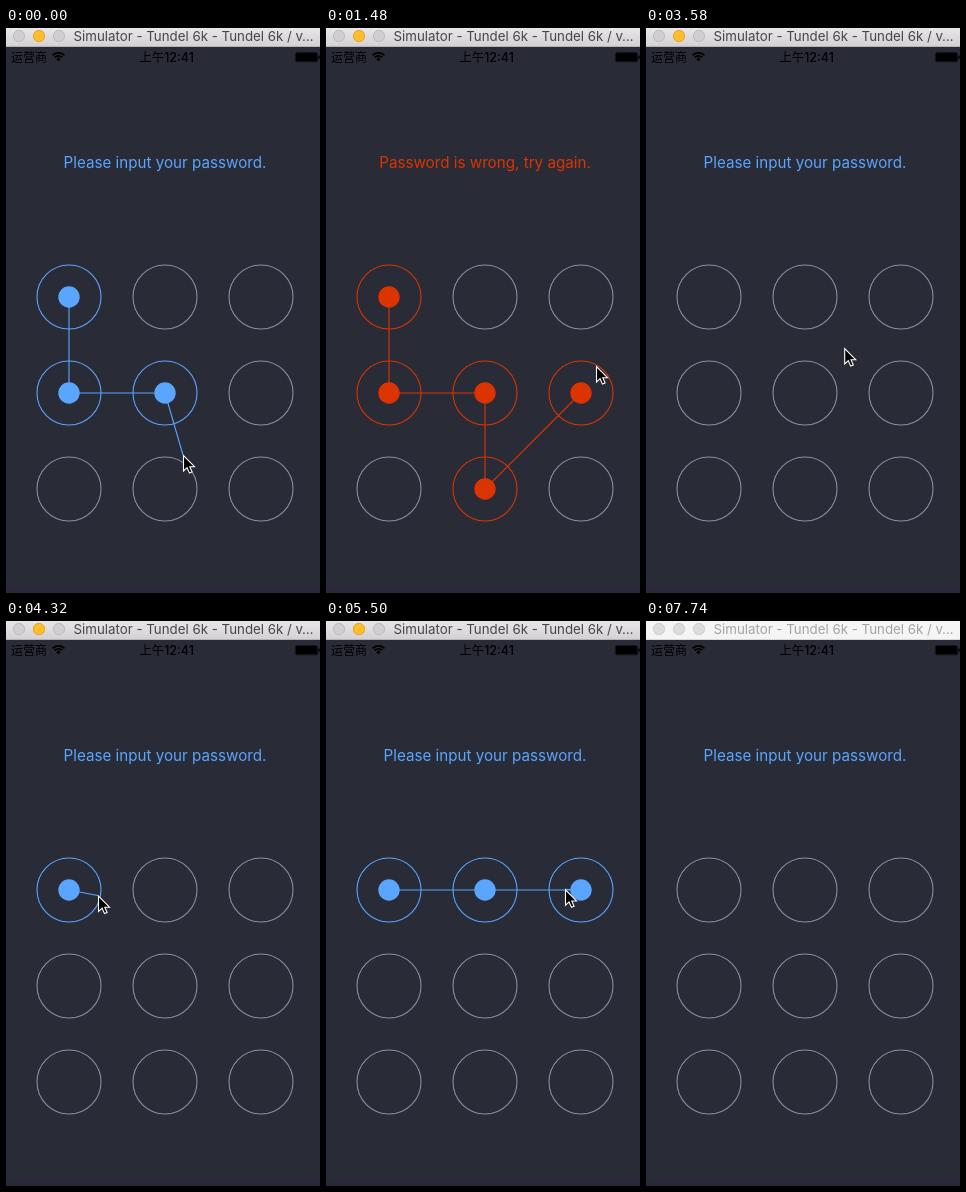
Write an HTML page with a canvas that moves like this. It is 314 px wide and 565 px high and loops after 7890 ms.

```html
<!DOCTYPE html>
<html lang="en">
<head>
<meta charset="utf-8">
<title>Pattern lock</title>
<style>
html, body { margin: 0; width: 100%; height: 100%; overflow: hidden; background: #292b37; }
canvas { display: block; }
</style>
</head>
<body>
<canvas id="stage" width="314" height="565"></canvas>
<script>
const ctx = document.getElementById('stage').getContext('2d');
const LOOP = 7890, STEP = 145, RADIUS = 32, THIN = 1.1;
const BLUE = '#5aa6ff', RED = '#dc3400', IDLE = '#8c8da8';
const SANS = 'Inter, "Open Sans", sans-serif';
const CJK = 'Inter, "Noto Sans CJK SC", "Noto Sans CJK", sans-serif';

// Each phase holds until the next one; "lit" dots are selected from its start.
const phases = [
  { at: 0, path: [0, 3, 4, 7, 5], drag: true, lit: 3 },
  { at: 1480, path: [0, 3, 4, 7, 5], color: RED, text: 'Password is wrong, try again.' },
  { at: 3430, path: [] },
  { at: 4020, path: [0, 1, 2], drag: true, lit: 0 },
  { at: 5650, path: [0, 1, 2], text: 'Password is right, success.' },
  { at: 7740, path: [], inactive: true }
];

// The pointer follows each polyline in equal steps, then rests at its end.
const moves = [
  { at: 150, steps: 7, via: [[177, 427], [172, 447], [204, 418], [270, 338]] },
  { at: 3130, steps: 5, via: [[275, 336], [179, 316]] },
  { at: 4020, steps: 8, via: [[179, 316], [120, 285], [64, 264], [182, 272], [221, 272]] },
  { at: 5210, steps: 4, via: [[221, 272], [245, 267]] },
  { at: 6400, steps: 1, via: [[245, 267], [298, 268]] }
];
const POINTER_GONE = 6550;

const arrow = new Path2D('M0 0V15.5L3.6 12.2L6 17.6L8.6 16.5L6.3 11.2H11Z');
const dotAt = i => [63 + i % 3 * 96, 269 + Math.floor(i / 3) * 96];
const latest = (list, t) => list.filter(e => e.at <= t).pop() || list[0];

function along(points, progress) {
  const f = progress * (points.length - 1);
  const i = Math.min(Math.floor(f), points.length - 2);
  const [a, b] = [points[i], points[i + 1]];
  return a.map((v, axis) => v + (b[axis] - v) * (f - i));
}

function pointerAt(t) {
  const { at, steps, via } = latest(moves, t);
  const n = Math.floor((t - at) / STEP) + 1;
  return along(via, Math.max(0, Math.min(n, steps)) / steps);
}

function touched(dot, from, to) {
  const [x, y] = dotAt(dot);
  for (let t = from; t <= to; t += 10) {
    const [px, py] = pointerAt(t);
    if (Math.hypot(px - x, py - y) < RADIUS) return true;
  }
  return false;
}

function disc(x, y, r, fill) {
  ctx.beginPath();
  ctx.arc(x, y, r, 0, 7);
  ctx.fillStyle = fill;
  ctx.fill();
}

function ring(x, y, r, stroke) {
  ctx.beginPath();
  ctx.arc(x, y, r, 0, 7);
  ctx.strokeStyle = stroke;
  ctx.stroke();
}

function rect(x, y, w, h, fill) {
  ctx.fillStyle = fill;
  ctx.fillRect(x, y, w, h);
}

function label(text, x, y, font, fill, align = 'left') {
  ctx.font = font;
  ctx.fillStyle = fill;
  ctx.textAlign = align;
  ctx.fillText(text, x, y);
}

function titleBar(inactive) {
  const g = ctx.createLinearGradient(0, 0, 0, 19);
  g.addColorStop(0, inactive ? '#f6f6f6' : '#e8e6e8');
  g.addColorStop(1, inactive ? '#f4f4f4' : '#d2d0d2');
  rect(0, 0, 314, 19, g);
  rect(0, 18, 314, 1, inactive ? '#d8d8d8' : '#b5b3b5');
  for (let i = 0; i < 3; i++) {
    const x = 13 + i * 20, lit = i === 1 && !inactive;
    disc(x, 8, 6, lit ? '#fdbf2d' : inactive ? '#dcdcdc' : '#d0ced0');
    ring(x, 8, 5.6, lit ? '#e2a52a' : inactive ? '#d0d0d0' : '#bebcbe');
  }
  label('Simulator - Tundel 6k - Tundel 6k / v…', 67.5, 13, '13.3px ' + SANS,
    inactive ? '#a4a4a4' : '#48464a');
}

function statusBar() {
  label('运营商', 5, 34, '12px ' + CJK, '#000');
  label('上午12:41', 160.5, 34, '500 12.5px ' + CJK, '#000', 'center');
  ctx.strokeStyle = '#000';
  ctx.lineWidth = 1.7;
  for (const r of [5.2, 8.2]) {
    ctx.beginPath();
    ctx.arc(52.5, 33, r, -Math.PI * 0.76, -Math.PI * 0.24);
    ctx.stroke();
  }
  disc(52.5, 31.3, 1.8, '#000');
  ctx.lineWidth = 0.6;
  ctx.beginPath();
  ctx.roundRect(289.3, 24.5, 22.4, 9.4, 2);
  ctx.stroke();
  rect(290, 25.2, 21, 8, '#000');
  rect(312.2, 27.7, 1.5, 3, '#000');
}

function pattern(path, color, tip) {
  ctx.lineWidth = THIN;
  for (let i = 0; i < 9; i++) {
    ring(...dotAt(i), RADIUS, path.includes(i) ? color : IDLE);
  }
  const points = path.map(dotAt);
  if (tip) points.push(tip);
  ctx.beginPath();
  points.forEach(p => ctx.lineTo(...p));
  ctx.strokeStyle = color;
  ctx.stroke();
  path.forEach(i => disc(...dotAt(i), 10.7, color));
}

function cursor([x, y]) {
  ctx.save();
  ctx.translate(x + 0.5, y + 0.5);
  ctx.fillStyle = '#000';
  ctx.fill(arrow);
  ctx.strokeStyle = '#fff';
  ctx.stroke(arrow);
  ctx.restore();
}

function draw(t) {
  const phase = latest(phases, t);
  const { at, drag, lit, color = BLUE, text = 'Please input your password.' } = phase;
  const tip = pointerAt(t);
  const path = phase.path.filter((dot, i) => !drag || i < lit || touched(dot, at, t));

  ctx.lineWidth = 1;
  rect(0, 0, 314, 565, '#292b37');
  rect(0, 560, 314, 5, '#2b263a');
  titleBar(phase.inactive);
  statusBar();
  label(text, 159, 140, '15.2px ' + SANS, color, 'center');
  pattern(path, color, drag && tip);
  if (t < POINTER_GONE) cursor(tip);
}

const start = performance.now();
function tick() {
  draw((performance.now() - start) % LOOP);
  requestAnimationFrame(tick);
}
tick();
</script>
</body>
</html>
```
